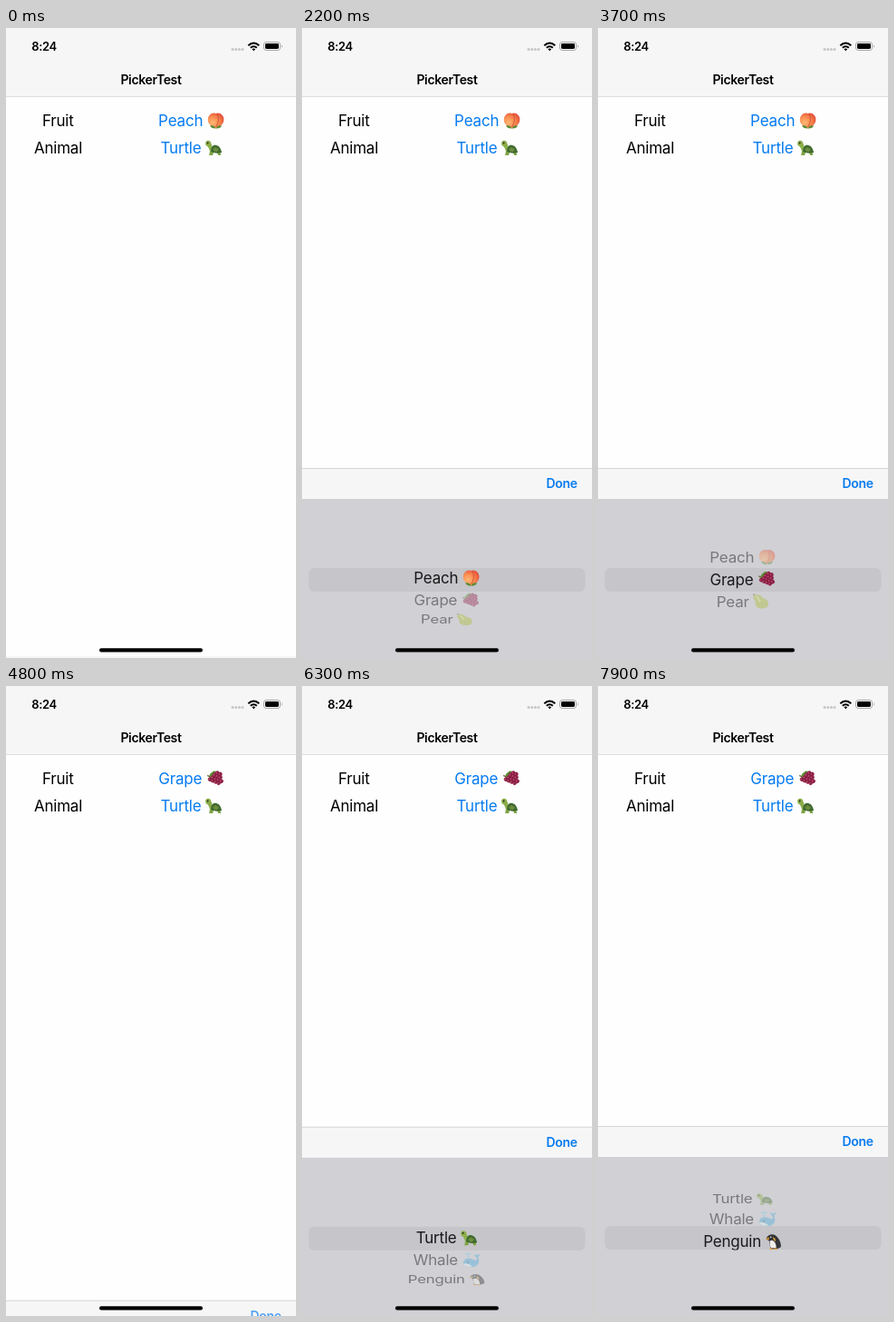
An HTML page for the animation above (8 s loop, 320x693 px).

```html
<!DOCTYPE html>
<html lang="en">
<head>
<meta charset="utf-8">
<title>Picker</title>
<style>
  html, body { margin: 0; width: 100%; height: 100%; overflow: hidden; background: #fefefe; }
  svg { display: block; width: 100%; height: 100%; }
  text { font: 17px Inter, "Liberation Sans", sans-serif; letter-spacing: -.012em; }
  .bar { font-size: 14px; font-weight: 600; letter-spacing: -.025em; }
  .clock { font-size: 13px; font-weight: 600; letter-spacing: -.03em; }
  .link { fill: #067bf0; }
</style>
</head>
<body>
<svg viewBox="0 0 320 693">
  <defs>
    <clipPath id="band"><rect x="7" y="594" width="306" height="26"/></clipPath>
    <clipPath id="outside"><path d="M0 518H320V594H0ZM0 620H320V693H0Z"/></clipPath>
    <radialGradient id="peachSkin" cx=".3" cy=".65" r=".75">
      <stop offset="0" stop-color="#ffb878"/><stop offset=".5" stop-color="#fb8f52"/><stop offset="1" stop-color="#e4503a"/>
    </radialGradient>

    <!-- Icons are centred on 0,0 and about 18 units wide -->
    <g id="peach">
      <path d="M0-8C4-10 9-6 8.8-1C8.5 4 4 7 0 8C-5 7-8.7 3.5-8.8-1C-8.9-6-4-10 0-8Z" fill="url(#peachSkin)"/>
      <path d="M1-8Q5-1 0 7" fill="none" stroke="#d04f35" stroke-width=".9"/>
      <path d="M0 8.5Q-5 9-6.5 5.5Q-2 4.5 0 8.5Q2 4.5 6.5 5.5Q5 9 0 8.5Z" fill="#5d8a35"/>
    </g>
    <g id="grape">
      <g transform="rotate(-45)">
        <path d="M-5-4Q-3-9 2-8Q6-8 6-4L1-2Z" fill="#5c8a35"/>
        <path d="M-3-6L-4-9" stroke="#7a6a35" stroke-width="1.4"/>
        <g id="berries" fill="#8c1f45"></g>
      </g>
    </g>
    <g id="pear">
      <path d="M-6-8C-2-9 1-7 3-4C9-3 10 3 8 6C5 9-2 9-5 5C-6 2-5 0-7-3C-9-5-8-7-6-8Z" fill="#aebf35"/>
      <path d="M-5-6C-2-6-2-2 0 0" fill="none" stroke="#dce47c" stroke-width="1.6"/>
      <path d="M-6-8L-8-9" stroke="#75572b" stroke-width="1.3"/>
    </g>
    <g id="turtle">
      <path d="M-4 3L-5 8H-1L0 5L4 5L5 8H8L7 3Z" fill="#80a344"/>
      <path d="M-9-5C-9-9-4-9-3-6L0 3L-4 4C-5 1-6-2-8-2.5Q-9-3-9-5Z" fill="#8caf4a"/>
      <path d="M-3 4C-3-2 0-4 3-3C7-2 8 1 9 5Q3 7-3 4Z" fill="#3f6b31"/>
      <path d="M-1 1.5L2-1L6 1.5L4 4H1Z" fill="#6d8b3c"/>
      <circle cx="-6.5" cy="-5.5" r=".9" fill="#222"/>
    </g>
    <g id="whale">
      <path d="M-9 3C-9-2-4-3-1-2C3-1 4 1 6-1L5-4Q3-6 3-8L6-6L9-8Q9-5 7-4C10 2 7 8 0 8C-5 8-9 7-9 3Z" fill="#4eaedc"/>
      <path d="M-9 4Q-4 3 1 7Q-7 9-9 4Z" fill="#e8f0f4"/>
      <path d="M-4-3V-7Q-5-9-7-7M-4-7Q-3-9-1-7" fill="none" stroke="#79cdee" stroke-width="1.4"/>
      <circle cx="-4" cy="2" r=".8" fill="#222"/>
    </g>
    <g id="penguin">
      <path d="M-8-3C-7-8-1-9 2-7C6-4 9 2 8 6L4 8H-2C-5 6-4 1-5-1Z" fill="#333438"/>
      <path d="M-4-1C0-3 3 1 3 7H-2C-5 5-4 2-4-1Z" fill="#f0eeea"/>
      <path d="M-1-5Q3-4 2 0Q0-1-1-5Z" fill="#e6a837"/>
      <path d="M-5-5L-9-3L-5-2Z" fill="#e29a2e"/>
      <path d="M-4 8H-1M1 8H4" stroke="#df9a30" stroke-width="1.5"/>
      <circle cx="-3" cy="-5" r=".8" fill="#fff"/>
    </g>
  </defs>

  <rect width="320" height="693" fill="#fefefe"/>
  <rect y="691" width="320" height="2" fill="#f6f6f6"/>
  <rect width="320" height="75" fill="#f6f6f6"/>
  <rect y="75" width="320" height=".8" fill="#d8d8da"/>
  <text class="clock" x="28.3" y="25">8:24</text>
  <g fill="#c6c6c8">
    <circle cx="250" cy="23.5" r="1.5"/><circle cx="253.7" cy="23.5" r="1.5"/>
    <circle cx="257.4" cy="23.5" r="1.5"/><circle cx="261" cy="23.5" r="1.5"/>
  </g>
  <g fill="none" stroke="#000" stroke-width="2">
    <path d="M267.3 19.3Q273.3 13.6 279.3 19.3"/><path d="M269.8 21.8Q273.3 18.6 276.8 21.8"/>
  </g>
  <path d="M271.4 23.2Q273.3 21.8 275.2 23.2L273.3 25.3Z"/>
  <rect x="284.5" y="15.5" width="18" height="9" rx="2.6" fill="none" stroke="#a0a0a2" stroke-width=".9"/>
  <rect x="286" y="17" width="15" height="6" rx="1.4"/>
  <path d="M304 18.5Q306 20 304 21.5Z" fill="#a0a0a2"/>
  <text class="bar" x="160" y="61.5" text-anchor="middle">PickerTest</text>
  <text x="57.3" y="108" text-anchor="middle">Fruit</text>
  <text x="57.5" y="138" text-anchor="middle">Animal</text>
  <g id="fruitButton" class="link"></g>
  <g id="animalButton" class="link"></g>

  <g id="sheet">
    <rect y="484" width="320" height="34" fill="#f6f6f6"/>
    <rect y="484" width="320" height=".8" fill="#cdcdd0"/>
    <text id="done" class="bar link" x="303.6" y="506" text-anchor="end">Done</text>
    <rect y="518" width="320" height="175" fill="#d0d0d5"/>
    <rect x="7.5" y="594" width="305" height="26" rx="6" fill="#c5c5ca"/>
    <g id="faded" clip-path="url(#outside)"></g>
    <g id="focused" clip-path="url(#band)" fill="#19191a"></g>
  </g>
  <rect id="home" x="103" y="682.3" width="114" height="4.2" rx="2.1"/>
</svg>
<script>
const LOOP = 8000, CENTER = 606.5, RADIUS = 66, STEP = 0.381, SHEET_HEIGHT = 209;

// name, icon, half width
const FRUITS = [["Peach", "peach", 36.5], ["Grape", "grape", 36.3], ["Pear", "pear", 29]];
const ANIMALS = [["Turtle", "turtle", 34], ["Whale", "whale", 37], ["Penguin", "penguin", 43.5]];

// start, end, from, to
const FRUIT_SCROLL = [[2157, 2800, 0, 2], [2970, 3700, 2, 1]];
const ANIMAL_SCROLL = [[6957, 7600, 0, 2], [7770, 8440, 2, 1]];

const $ = id => document.getElementById(id);
const clamp = x => Math.min(1, Math.max(0, x));
const smooth = x => { x = clamp(x); return x * x * (3 - 2 * x); };

// A short drag that runs out slowly
const flick = x => smooth(1 - (1 - clamp(x)) ** 1.5);

// Critically damped spring, as used by the system keyboard
const spring = ms => {
  const s = 18.26 * Math.max(0, ms) / 1000;
  return 1 - (1 + s) * Math.exp(-s);
};

const item = ([name, icon, half]) =>
  `<text x="${-half}" y="6">${name}</text><use href="#${icon}" x="${half - 9.5}"/>`;

const scrollAt = (moves, t) =>
  moves.reduce((pos, [start, end, from, to]) =>
    t < start ? pos : from + (to - from) * flick((t - start) / (end - start)), 0);

const pressed = (t, down, up) =>
  t < down ? 1 : 0.2 + 0.8 * smooth((t - up) / 400);

function setContent(node, html) {
  if (node.content !== html) node.innerHTML = node.content = html;
}

function drawWheel(items, position) {
  for (const layer of [$("faded"), $("focused")]) {
    setContent(layer, items.map(entry => `<g>${item(entry)}</g>`).join(""));
    items.forEach((_, i) => {
      const angle = (i - position) * STEP;
      const y = CENTER + RADIUS * Math.sin(angle);
      const depth = Math.cos(angle);
      const row = layer.children[i];
      row.setAttribute("transform", `translate(159.7 ${y}) scale(${0.95 + 0.05 * depth} ${depth})`);
      row.setAttribute("opacity", layer.id === "focused" ? 1 : 0.42);
    });
  }
}

function drawButton(node, entry, y, opacity) {
  setContent(node, item(entry));
  node.setAttribute("transform", `translate(204.6 ${y})`);
  node.setAttribute("opacity", opacity);
}

function render(t) {
  const second = t >= 5300;
  const shown = second ? spring(t - 5875) : spring(t - 675) - spring(t - 4575);
  $("sheet").setAttribute("transform", `translate(0 ${SHEET_HEIGHT * (1 - shown)})`);
  $("sheet").setAttribute("visibility", shown > 0.004 ? "visible" : "hidden");
  $("done").setAttribute("opacity", second ? 1 : pressed(t, 4500, 4575));
  drawWheel(second ? ANIMALS : FRUITS, scrollAt(second ? ANIMAL_SCROLL : FRUIT_SCROLL, t));
  drawButton($("fruitButton"), FRUITS[t < 4575 ? 0 : 1], 102, pressed(t, 500, 600));
  drawButton($("animalButton"), ANIMALS[0], 132, pressed(t, 5700, 5850));
  $("home").setAttribute("fill", t >= 5700 && t < 5900 ? "#666" : "#000");
}

$("berries").innerHTML = [4, 4, 3, 2].map((count, row) =>
  Array.from({ length: count }, (_, i) => {
    const x = -5 + i * 3.6 + row * 1.3, y = -4 + row * 3.2 + (i % 2) * 0.7;
    return `<circle cx="${x}" cy="${y}" r="2.3"/><circle cx="${x - 0.6}" cy="${y - 0.6}" r=".8" fill="#bd4f6e"/>`;
  }).join("")).join("");

const begin = performance.now();
function tick() {
  render((performance.now() - begin) % LOOP);
  requestAnimationFrame(tick);
}
tick();
</script>
</body>
</html>
```
